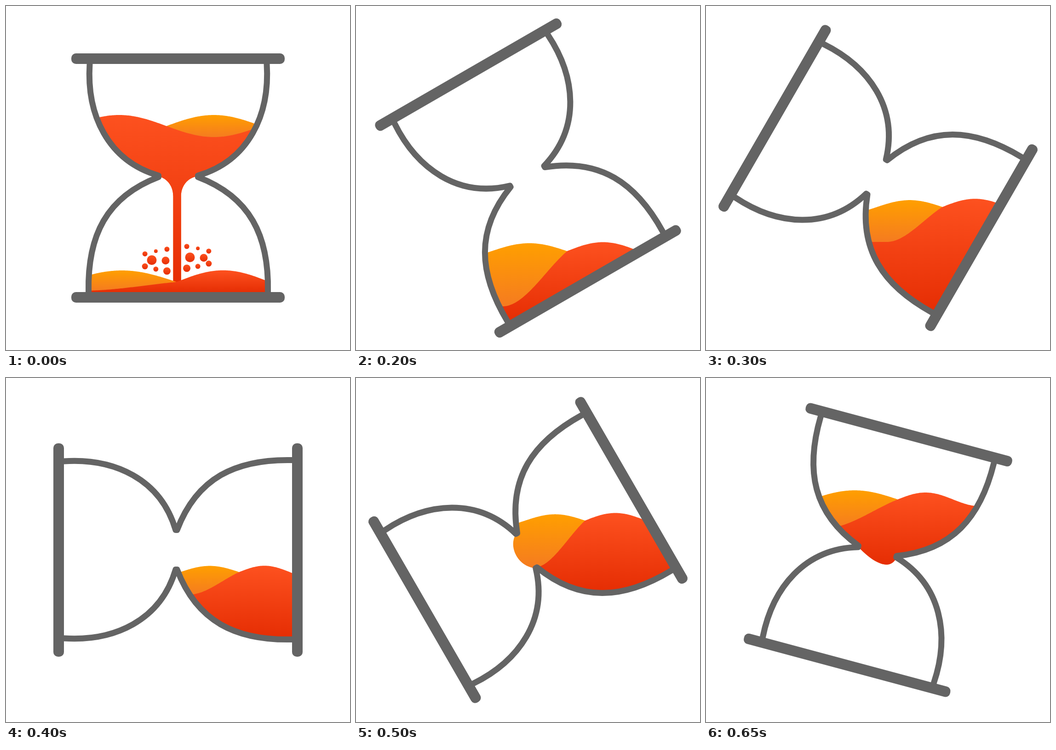
These frames come from a looping animation (748x748 px, 700 ms). An HTML page with a canvas:

```html
<!DOCTYPE html>
<html lang="en">
<head>
<meta charset="utf-8">
<title>Hourglass</title>
<style>
  html, body { margin: 0; width: 100%; height: 100%; overflow: hidden; background: #fff; }
  canvas { display: block; width: 748px; height: 748px; }
</style>
</head>
<body>
<canvas id="stage" width="748" height="748"></canvas>
<script>
const ctx = document.getElementById('stage').getContext('2d');
const SIZE = 748, MID = 374, STEP = 50, LOOP = 700, TURN_START = 100;
const GREY = '#646464', RED = ['#fd511f', '#e62e04'], ORANGE = ['#ff9f00', '#f57b20'];

// Two waves meet at (x, y): an orange hump to the left, a red one to the right.
// back and front are their half widths, depth is how far the red tail sinks.
const pool = [
  { t: 0, x: 371, y: 600, back: 119, front: 101, depth: 19 },
  { t: 100, x: 364, y: 532, back: 97, front: 89, depth: 58 },
  { t: 200, x: 459, y: 533, back: 82, front: 78, depth: 120 },
  { t: 300, x: 514, y: 437, back: 71, front: 71, depth: 76 },
  { t: 400, x: 507, y: 422, back: 64, front: 55, depth: 49 },
  { t: 500, x: 498, y: 310, back: 65, front: 66, depth: 102 },
  { t: 650, x: 417, y: 264, back: 94, front: 60, depth: 63 }
];

const lerp = (a, b, k) => a + (b - a) * k;
const clamp = k => Math.max(0, Math.min(1, k));
const hump = (dx, width) => Math.sin(Math.PI / 2 * dx / width);

function sample(keys, t) {
  let i = 0;
  while (i < keys.length - 2 && t >= keys[i + 1].t) i++;
  const a = keys[i], b = keys[i + 1], k = clamp((t - a.t) / (b.t - a.t));
  return Object.fromEntries(Object.keys(a).map(name => [name, lerp(a[name], b[name], k)]));
}

function ramp(y0, y1, [from, to]) {
  const g = ctx.createLinearGradient(0, y0, 0, y1);
  g.addColorStop(0, from);
  g.addColorStop(1, to);
  return g;
}

// Fill everything below y = height(x) between x0 and x1.
function fillBelow(height, x0, x1, fill) {
  ctx.beginPath();
  ctx.moveTo(x0, SIZE);
  for (let x = x0; x < x1; x += 2) ctx.lineTo(x, height(x));
  ctx.lineTo(x1, height(x1));
  ctx.lineTo(x1, SIZE);
  ctx.fillStyle = fill;
  ctx.fill();
}

function turn(angle) {
  ctx.translate(MID, MID);
  ctx.rotate(angle);
  ctx.translate(-MID, -MID);
}

// Upper bulb and stream: two opposite sine waves that sink and flatten.
function drawFeed(k, end) {
  const x0 = lerp(349, 365, k), y0 = lerp(261, 346, k);
  const amp = lerp(24, 12, k), width = lerp(103, 61, k);
  const l = lerp(363.5, 364.5, k), r = l + 17.2;
  const swell = x => amp * hump(x - x0, width);
  ctx.save();
  ctx.clip(new Path2D(`M182 126 C175 235.5 220.3 336 331 370
    C352 376 ${l} 392 ${l} 414 V${end} H${r} V414 C${r} 392 394 373 418 370
    C528.7 336 574 235.5 567 126 Z`));
  fillBelow(x => y0 - swell(x), x0, SIZE, ramp(y0 - amp, y0 + amp, ORANGE));
  fillBelow(x => y0 + swell(x), 0, SIZE, ramp(y0 - amp, end, RED));
  ctx.restore();
}

// Lowest point the liquid can reach: a corner, the belly of the wall or the neck.
function floorAt(angle) {
  const low = [[-188, 248], [-155, 95], [0, -30]]
    .map(([x, y]) => x * Math.sin(angle) + y * Math.cos(angle));
  return MID + Math.max(...low);
}

function drawPool(s, angle, t) {
  const { x: x0, y: y0, back, front, depth } = s;
  const rise = 0.21 * back, crest = 0.25 * front, tail = 1.7 * back;
  const skew = clamp((t - 500) / 150);
  ctx.save();
  turn(angle);
  ctx.clip(new Path2D(`M179.5 632 V622 C177 499 218.6 415 331 370
    C${350 - 16 * skew} 338 ${402 - 30 * skew} ${338 + 3 * skew} 418 370
    C530.4 415 572 499 569.5 622 V632 Z`));
  ctx.setTransform(1, 0, 0, 1, 0, 0);

  const behind = x => y0 - rise * hump(x0 - x, back);
  const ahead = x => {
    if (x > x0) return y0 - crest * hump(x - x0, front);
    const u = clamp((x0 - x) / tail);
    return y0 + depth * (u + u * u - u * u * u);
  };
  fillBelow(behind, 0, x0, ramp(y0 - rise, y0 + depth, ORANGE));
  fillBelow(ahead, 0, SIZE, ramp(y0 - crest, floorAt(angle), RED));
  ctx.restore();
}

function dot(x, y, r) {
  ctx.beginPath();
  ctx.arc(x, y, r, 0, 2 * Math.PI);
  ctx.fillStyle = ramp(y - r, y + r, RED);
  ctx.fill();
}

// Splashes: a mirrored ring of small drops around two big ones on each side.
function drawDrops(k) {
  const scale = lerp(1, 0.8, k);
  for (const side of [-1, 1]) {
    const cx = 371.5 + side * 41.5, cy = lerp(549.5, 486, k) - side * 3;
    dot(cx - 13 * scale, cy, 10.5);
    dot(cx + 17 * scale, cy + 1, 8.5);
    [8, 5.5, 6.5, 5.5, 4, 5.5].forEach((r, i) => {
      const a = (50 + 52 * i) * Math.PI / 180;
      const reach = scale * (i % 3 === 1 ? 20 : 31);
      dot(cx - side * reach * Math.cos(a), cy + reach * Math.sin(a), r);
    });
  }
}

function drawGlass(angle) {
  const wall = new Path2D(`M182 120 V126 C175 235.5 220.3 336 331.5 368.8
    V372 C218.6 415 177 499 179.5 622 V626`);
  ctx.save();
  turn(angle);
  ctx.strokeStyle = ctx.fillStyle = GREY;
  ctx.lineWidth = 13;
  ctx.lineCap = ctx.lineJoin = 'round';
  for (const y of [103, 622]) {
    ctx.beginPath();
    ctx.roundRect(142, y, 464, 23, 10);
    ctx.fill();
  }
  ctx.stroke(wall);
  ctx.translate(749, 0);
  ctx.scale(-1, 1);
  ctx.stroke(wall);
  ctx.restore();
}

function draw(now) {
  const t = Math.floor((now % LOOP) / STEP) * STEP;
  const angle = -Math.max(0, t - TURN_START) / (LOOP - TURN_START) * Math.PI;
  const flowing = t <= TURN_START, k = t / TURN_START;
  const s = sample(pool, t);
  ctx.fillStyle = '#fff';
  ctx.fillRect(0, 0, SIZE, SIZE);
  if (flowing) drawFeed(k, s.y);
  drawPool(s, angle, t);
  if (flowing) drawDrops(k);
  drawGlass(angle);
}

const start = performance.now();
function tick() {
  draw(performance.now() - start);
  requestAnimationFrame(tick);
}
tick();
</script>
</body>
</html>
```
